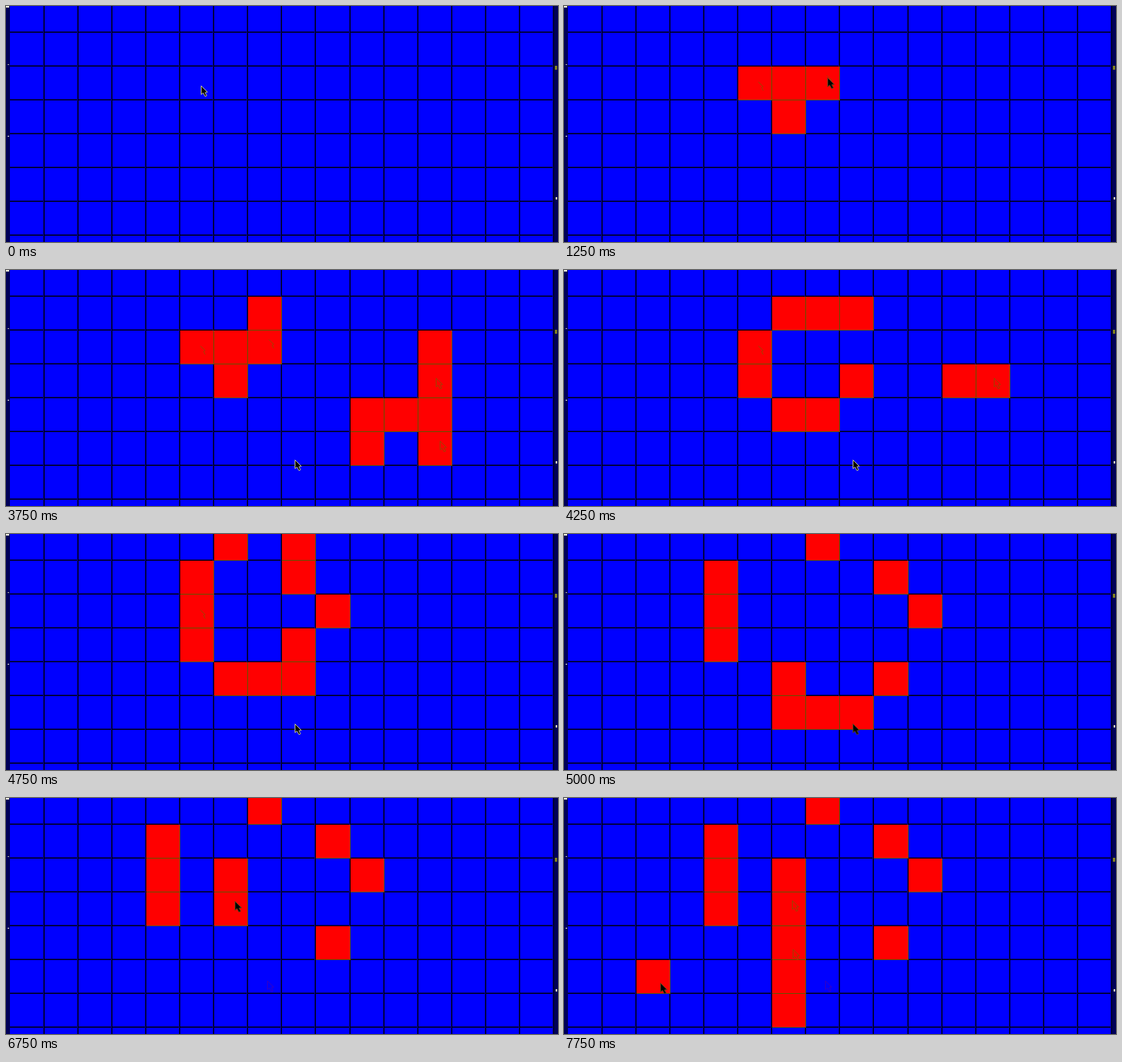
Animation of 700 by 300 pixels, one loop 8 s. Source, as an HTML page with a canvas:

```html
<!DOCTYPE html>
<html lang="en">
<head>
<meta charset="utf-8">
<title>Game of Life</title>
<style>
html, body { margin: 0; width: 100%; height: 100%; overflow: hidden; background: #00f; }
canvas { display: block; }
</style>
</head>
<body>
<canvas id="stage" width="700" height="300"></canvas>
<script>
const ctx = document.getElementById('stage').getContext('2d');
const STEP = 250, STEPS = 32, COLS = 16;
const colX = c => Math.round(5.5 + 43.1 * c);
const rowY = r => 43 * r - 9;
const key = (c, r) => c + ',' + r;

// Each step of the pointer: x, y, then the cells it toggles.
const beforeRun = [
  [247, 101], [245, 95, '5,2'], [288, 98, '6,2'], [286, 140, '6,3'],
  [332, 87, '7,2'], [334, 91], [330, 55, '7,1'], [450, 80],
  [545, 98, '12,2'], [547, 137, '12,3'], [550, 217, '12,4', '12,5'], [500, 185, '11,4'],
  [457, 187, '10,4'], [457, 228, '10,5'], [400, 240], [366, 241]
];
const afterRun = [
  [369, 236, '8,5'], [331, 232, '7,5'], [287, 238, '6,5'], [287, 190, '6,4'],
  [288, 40], [288, 98, '6,2'], [290, 131, '6,3'], [290, 192, '6,4'],
  [285, 262, '6,5', '6,6'], [81, 242], [122, 235, '2,5']
];
const RUN_START = beforeRun.length, RUN_STEPS = 5;

// Faint pointer traces: x, y, cell, first step, partial outline.
const traces = [
  [245, 95, '5,2', 2, true], [332, 87, '7,2', 5, true],
  [545, 137, '12,3', 10], [550, 217, '12,5', 11],
  [289, 130, '6,3', 28], [290, 192, '6,4', 29]
];

function nextGeneration(live) {
  const counts = new Map();
  for (const cell of live) {
    const [c, r] = cell.split(',').map(Number);
    for (let dc = -1; dc <= 1; dc++)
      for (let dr = -1; dr <= 1; dr++)
        if (dc || dr) {
          const k = key(c + dc, r + dr);
          counts.set(k, (counts.get(k) || 0) + 1);
        }
  }
  return new Set([...counts].filter(([k, n]) => n === 3 || (n === 2 && live.has(k))).map(([k]) => k));
}

function buildStates() {
  const states = [];
  let live = new Set(), pointer, generation = 0;
  const edit = ([x, y, ...cells]) => {
    pointer = [x, y];
    live = new Set(live);
    for (const k of cells) if (!live.delete(k)) live.add(k);
    states.push({ live, pointer });
  };
  beforeRun.forEach(edit);
  for (let i = 0; i < RUN_STEPS; i++) {
    const goal = Math.round(2 + 1.75 * i);
    for (; generation < goal; generation++) live = nextGeneration(live);
    states.push({ live, pointer });
  }
  afterRun.forEach(edit);
  return states;
}
const states = buildStates();

function rect(color, x, y, w, h) {
  ctx.fillStyle = color;
  ctx.fillRect(x, y, w, h);
}

function pointerPath(x, y, partial) {
  const points = partial
    ? [[1, 1], [7, 7], [5, 8], [7, 12]]
    : [[0, 0], [0, 11], [2.5, 9], [5, 13.5], [7, 12.5], [5, 8.5], [8, 8]];
  ctx.beginPath();
  for (const [px, py] of points) ctx.lineTo(x + px + .5, y + py + .5);
  if (!partial) ctx.closePath();
}

function drawTrace(color, x, y, partial) {
  pointerPath(x, y, partial);
  ctx.strokeStyle = color;
  ctx.stroke();
}

function drawGrid() {
  rect('#00f', 0, 0, 700, 300);
  for (let r = 1; r <= 7; r++) {
    rect('#000090', 0, rowY(r) - 2, 700, 1);
    rect('#000014', 0, rowY(r) - 1, 700, 1);
  }
  for (let c = 1; c <= COLS; c++) {
    rect('#000090', colX(c) - 2, 0, 1, 300);
    rect('#000014', colX(c) - 1, 0, 1, 300);
  }
  rect('#000058', 0, 0, 5, 300);
  rect('#000058', 695, 0, 5, 300);
  rect('#e8e8d8', 0, 0, 4, 2);
  rect('#a0a0a0', 2, 74, 2, 1);
  rect('#e0e0e0', 2, 165, 2, 1);
  rect('#808020', 696, 76, 3, 5);
  rect('#e0e0c0', 697, 243, 2, 3);
}

function drawCell(cell) {
  const [c, r] = cell.split(',').map(Number);
  const x = colX(c), y = rowY(r), w = colX(c + 1) - x, h = rowY(r + 1) - y;
  rect('#685000', x, y, w, h);
  rect('#f00', x, y, w - 1, h - 1);
}

function draw(step) {
  const { live, pointer: [x, y] } = states[step];
  drawGrid();
  live.forEach(drawCell);
  ctx.lineWidth = 1;
  for (const [tx, ty, cell, from, partial] of traces)
    if (step >= from && live.has(cell)) drawTrace('#a04000', tx, ty, partial);
  if (step > 22) drawTrace('#3000c8', 331, 232);
  pointerPath(x, y);
  const onCell = [...live].some(k => {
    const [c, r] = k.split(',').map(Number);
    return x >= colX(c) && x < colX(c + 1) && y >= rowY(r) && y < rowY(r + 1);
  });
  ctx.fillStyle = '#000';
  ctx.strokeStyle = onCell ? '#50401c' : '#b8b890';
  ctx.fill();
  ctx.stroke();
}

const start = performance.now();
function frame() {
  draw(Math.floor((performance.now() - start) / STEP) % STEPS);
  requestAnimationFrame(frame);
}
frame();
</script>
</body>
</html>
```
